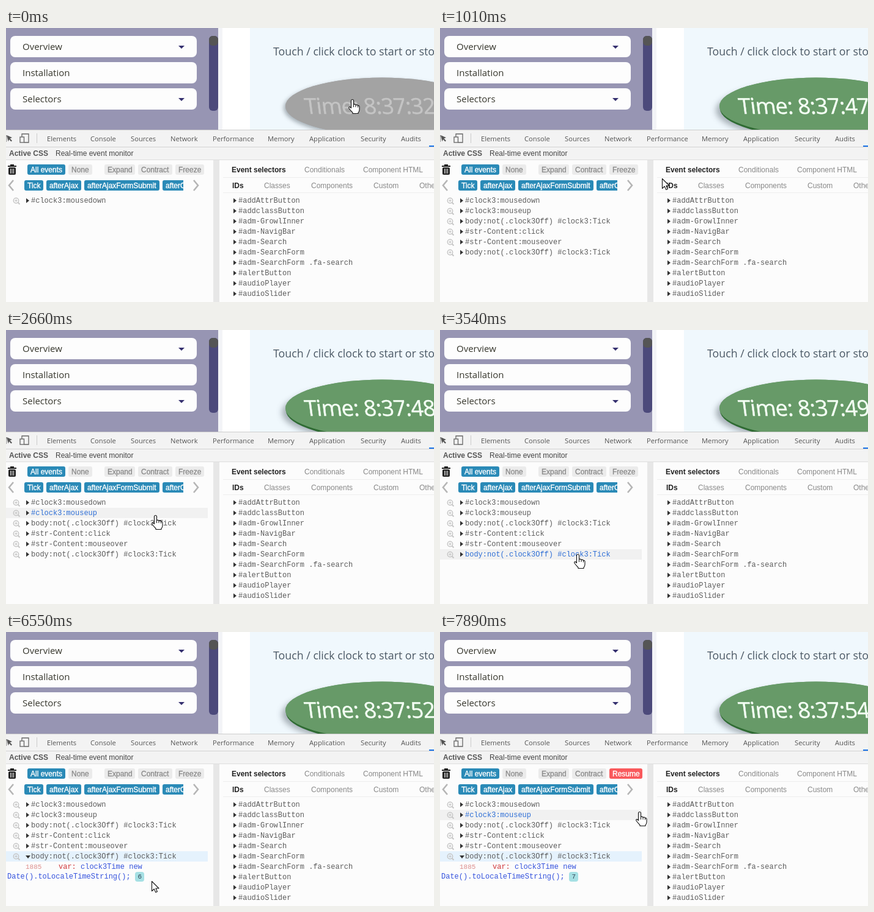
An HTML page with a canvas that plays this animation: 700x450 px, repeating every 8 s.

```html
<!DOCTYPE html>
<html lang="en">
<head>
<meta charset="utf-8">
<title>Real-time event monitor</title>
<style>
html, body { margin: 0; width: 100%; height: 100%; overflow: hidden; background: #fff; }
canvas { display: block; width: 700px; height: 450px; }
</style>
</head>
<body>
<canvas id="stage" width="700" height="450"></canvas>
<script>
const ctx = document.getElementById('stage').getContext('2d');
const LOOP = 8000;
const UI = '"Open Sans", "Noto Sans", sans-serif';
const ARIAL = '"Liberation Sans", Arial, sans-serif';
const MONO = '"Liberation Mono", "Courier New", monospace';
const BLUE = '#2a8ab7', INK = '#5c5c5c';

const TICKS = [130, 1010, 2050, 3100, 3970, 4980, 5990, 6980, 7890];
const RELEASE = 130, LEAVE = 570, EXPAND = 3670, FREEZE = 7130;

// Pointer legs: first step, last step, number of steps, end point
const LEGS = [
  [280, 1010, 6, 363, 247],
  [1160, 1160, 1, 338, 268],
  [1320, 1770, 4, 250, 294],
  [2510, 2660, 2, 245, 305],
  [2810, 3240, 4, 226, 369],
  [3970, 4680, 6, 221, 427],
  [4830, 4980, 2, 233, 414],
  [5560, 5690, 2, 237, 411],
  [5990, 6550, 5, 238, 409],
  [6690, 6980, 3, 300, 228],
  [7440, 7890, 4, 327, 296]
];

const TICK_ROW = 'body:not(.clock3Off) #clock3:Tick';
const EVENTS = [
  ['#clock3:mousedown', 0],
  ['#clock3:mouseup', RELEASE],
  [TICK_ROW, RELEASE],
  ['#str-Content:click', RELEASE],
  ['#str-Content:mouseover', LEAVE],
  [TICK_ROW, TICKS[1]]
];
const SELECTORS = ['#addAttrButton', '#addclassButton', '#adm-GrowlInner', '#adm-NavigBar',
  '#adm-Search', '#adm-SearchForm', '#adm-SearchForm .fa-search', '#alertButton',
  '#audioPlayer', '#audioSlider'];

const HAND = new Path2D('M-2.5 1.5Q-2.5-.5-.5-.5Q1.5-.5 1.5 1.5V7.5Q4 6.5 5 8.5Q7.5 7.5 8.5 9.5' +
  'Q11 9 11 11.5V16Q11 19 9 21V22.5H0V21Q-3 18-6 14Q-7 11.5-4.5 11.5L-2.5 13.5Z');
const ARROW = new Path2D('M.5.5V16.5L4.3 13L6.8 18.6L9.4 17.5L7 12H12Z');
const INSPECT = new Path2D('M1 176L10 180L6.5 181.5L10 185L8.5 186.5L5 183L3.5 186.5Z');

function rect(x, y, w, h, color) {
  ctx.fillStyle = color;
  ctx.fillRect(x, y, w, h);
}

function round(x, y, w, h, r, color) {
  ctx.fillStyle = color;
  ctx.beginPath();
  ctx.roundRect(x, y, w, h, r);
  ctx.fill();
}

function text(str, x, y, font, color) {
  ctx.font = font;
  ctx.fillStyle = color;
  ctx.fillText(str, x, y);
}

function heavyText(str, x, y, font, color, weight) {
  text(str, x, y, font, color);
  ctx.strokeStyle = color;
  ctx.lineWidth = weight;
  ctx.strokeText(str, x, y);
}

function poly(color, ...pts) {
  ctx.fillStyle = color;
  ctx.beginPath();
  for (let i = 0; i < pts.length; i += 2) ctx.lineTo(pts[i], pts[i + 1]);
  ctx.fill();
}

function line(color, width, ...pts) {
  ctx.strokeStyle = color;
  ctx.lineWidth = width;
  ctx.beginPath();
  for (let i = 0; i < pts.length; i += 2) ctx.lineTo(pts[i], pts[i + 1]);
  ctx.stroke();
}

function button(label, x, y, w, bg, color) {
  round(x, y, w, 17, 3, bg);
  heavyText(label, x + 5, y + 13, '12px ' + ARIAL, color, 0.35);
}

function pointerAt(t) {
  let x = 567, y = 118;
  for (const [from, to, steps, ex, ey] of LEGS) {
    if (t < from) break;
    const gap = steps > 1 ? (to - from) / (steps - 1) : 1;
    const done = Math.min(steps, 1 + Math.floor((t - from + 4) / gap));
    x += (ex - x) * done / steps;
    y += (ey - y) * done / steps;
  }
  return { x, y };
}

const inClock = p => p.y < 167 && Math.hypot((p.x - 615) / 158, (p.y - 128) / 47) < 1;
const inFreeze = p => p.x > 276 && p.x < 332 && p.y > 223 && p.y < 242;

function hoveredRow(p, count) {
  const i = Math.floor((p.y - 275) / 17);
  return p.x < 330 && i >= 0 && i < count ? i : -1;
}

function drawClock(t, ticks) {
  const on = t >= RELEASE;
  const oval = (dx, dy, color) => {
    ctx.fillStyle = color;
    ctx.beginPath();
    ctx.ellipse(615 + dx, 128 + dy, 158, 47, 0, 0, 7);
    ctx.fill();
  };
  ctx.save();
  ctx.beginPath();
  ctx.rect(399, 0, 301, 167);
  ctx.clip();
  ctx.save();
  ctx.shadowColor = 'rgba(70,80,90,.42)';
  ctx.shadowBlur = on ? 10 : 6;
  ctx.shadowOffsetX = on ? -6 : -3;
  ctx.shadowOffsetY = on ? 7 : 3;
  oval(0, 0.5, on ? '#679a68' : '#a3a3a3');
  ctx.restore();
  if (on) oval(1, 4, '#2f6b33');
  oval(0, 0.5, on ? '#679a68' : '#a3a3a3');
  ctx.letterSpacing = '-0.8px';
  const sec = on ? 45 + ticks : 32;
  ctx.translate(490, 141);
  ctx.transform(1, 0, 0.13, 1, 0, 0);
  heavyText('Time: 8:37:' + sec, 0, 0, '36px ' + UI, on ? '#f4fff4' : '#c4c4c4', 0.5);
  ctx.restore();
}

function drawPage(t, ticks) {
  rect(0, 0, 700, 167, '#fff');
  rect(0, 0, 347, 167, '#9795b3');
  rect(347, 0, 7, 167, '#f3f4f7');
  rect(399, 0, 301, 167, '#f0f8fd');
  ['Overview', 'Installation', 'Selectors'].forEach((label, i) => {
    const y = 13 + 43 * i;
    round(7, y, 305, 35, 8, '#fdfdfd');
    text(label, 27, y + 23, '15px ' + UI, '#36362c');
    if (i !== 1) poly('#35306f', 282, y + 16, 292, y + 16, 287, y + 21);
  });
  round(332, 13, 15, 123, 6, '#4c4a7b');
  round(332, 13, 15, 16, 6, '#555');
  text('Touch / click clock to start or stop', 437, 45, '17.8px ' + UI, '#4b5864');
  drawClock(t, ticks);
}

function drawTabs() {
  rect(0, 167, 700, 50, '#f3f3f3');
  rect(0, 167, 700, 1, '#cdcdcd');
  rect(0, 195, 700, 1, '#d2d2d2');
  rect(0, 216, 700, 1, '#dedede');
  rect(692, 193, 8, 2, '#1a73e8');
  ctx.fillStyle = '#555';
  ctx.fill(INSPECT);
  line('#666', 1.3, 0, 176, 0, 187);
  line('#666', 1.3, 26, 179, 26, 174, 37, 174, 37, 188, 30, 188);
  ctx.strokeRect(23, 179, 6.5, 9);
  rect(50, 173, 1, 16, '#ccc');
  const tabs = { Elements: 67, Console: 138, Sources: 204, Network: 269, Performance: 338,
    Memory: 428, Application: 496, Security: 580, Audits: 646 };
  for (const name in tabs) text(name, tabs[name], 186, '11.2px ' + UI, '#555');
  text('Active CSS', 5, 210, 'bold 12px ' + ARIAL, '#555');
  text('Real-time event monitor', 81, 210, '12px ' + ARIAL, '#444');
}

function drawToolbar(t) {
  rect(3, 226, 14, 2, '#222');
  rect(7, 224, 6, 2, '#222');
  round(4, 229, 12, 12, 2, '#222');
  for (const x of [7, 9.5, 12]) rect(x, 231, 1, 8, '#eee');

  button('All events', 35, 224, 62, BLUE, '#fff');
  button('None', 102, 224, 39, '#ebebeb', '#8c8c8c');
  button('Expand', 161, 224, 50, '#ebebeb', '#8c8c8c');
  button('Contract', 216, 224, 56, '#ebebeb', '#8c8c8c');
  if (t >= FREEZE) button('Resume', 277, 224, 54, '#f9595c', '#fff');
  else button('Freeze', 277, 224, 47, '#ebebeb', '#8c8c8c');

  line('#b5b5b5', 2.6, 12, 250, 5, 258.5, 12, 267);
  line('#b5b5b5', 2.6, 307, 250, 314, 258.5, 307, 267);
  ctx.save();
  ctx.beginPath();
  ctx.rect(30, 245, 260, 28);
  ctx.clip();
  button('Tick', 30, 250, 31, BLUE, '#fff');
  button('afterAjax', 66, 250, 57, BLUE, '#fff');
  button('afterAjaxFormSubmit', 128, 250, 123, BLUE, '#fff');
  button('afterClick', 256, 250, 66, BLUE, '#fff');
  ctx.restore();
}

function magnifier(x, y) {
  ctx.strokeStyle = '#c6c6c6';
  ctx.lineWidth = 1.5;
  ctx.beginPath();
  ctx.arc(x, y, 4.2, 0, 7);
  ctx.stroke();
  line('#c6c6c6', 2, x + 3, y + 3, x + 6, y + 6);
  line('#c6c6c6', 1.2, x - 2.2, y, x + 2.2, y);
  line('#c6c6c6', 1.2, x, y - 2.2, x, y + 2.2);
}

function drawEvents(t, ticks, count, hover) {
  const open = t >= EXPAND;
  for (let i = 0; i < count; i++) {
    const y = 284 + 17 * i;
    const expanded = open && i === 5;
    if (expanded) rect(0, y - 9, 330, 17, '#e5f2fd');
    else if (i === hover) rect(0, y - 9, 330, 17, '#f1f1f1');
    magnifier(16.5, y - 0.5);
    if (expanded) poly('#333', 32, y - 2, 40, y - 2, 36, y + 3);
    else poly('#333', 33, y - 4.5, 38, y - 0.5, 33, y + 3.5);
    text(EVENTS[i][0], 41, y + 3, '12px ' + MONO, i === hover ? '#2f6fd6' : INK);
  }
  if (!open) return;
  const mono = '12px ' + MONO;
  text('1885', 32, 389, '11px ' + MONO, '#dc8d8b');
  text('var:', 86, 389, mono, '#d0393c');
  text('clock3Time new', 122, 389, mono, '#3553dd');
  text('Date().toLocaleTimeString();', 2, 405, mono, '#3553dd');
  round(211, 394, 15, 16, 4, '#a6e0e4');
  text(Math.min(ticks - 1, 7), 215.5, 405, '11px ' + MONO, '#345');
}

function drawSelectors() {
  rect(339, 217, 10, 233, '#e7e7e7');
  rect(355, 245, 345, 1, '#eee');
  rect(355, 270, 345, 1, '#eee');
  const font = '12px ' + ARIAL;
  text('Event selectors', 369, 237, 'bold ' + font, '#222');
  text('IDs', 370, 263, 'bold ' + font, '#222');
  const tab = (label, x, y) => text(label, x, y, font, '#888');
  tab('Conditionals', 488, 237);
  tab('Component HTML', 584, 237);
  tab('Classes', 422, 263);
  tab('Components', 499, 263);
  tab('Custom', 601, 263);
  tab('Other', 676, 263);
  SELECTORS.forEach((label, i) => {
    const y = 284 + 17 * i;
    poly('#333', 372, y - 4.5, 377, y - 0.5, 372, y + 3.5);
    text(label, 380, y + 3, '12px ' + MONO, INK);
  });
}

function drawPointer(p, hand) {
  ctx.save();
  ctx.translate(p.x, p.y);
  const shape = hand ? HAND : ARROW;
  ctx.fillStyle = '#fff';
  ctx.fill(shape);
  ctx.strokeStyle = '#111';
  ctx.lineWidth = 1.1;
  ctx.lineJoin = 'round';
  ctx.stroke(shape);
  if (hand) {
    line('#111', 1, 1.5, 7.5, 1.5, 12);
    line('#111', 1, 5, 8.5, 5, 12);
    line('#111', 1, 8.5, 9.5, 8.5, 12.5);
  }
  ctx.restore();
}

function draw(t) {
  const ticks = TICKS.filter(at => t >= at).length;
  const count = EVENTS.filter(e => t >= e[1]).length;
  const p = pointerAt(t);
  const hover = hoveredRow(p, count);
  rect(0, 0, 700, 450, '#fcfcfc');
  drawPage(t, ticks);
  drawTabs();
  drawToolbar(t);
  drawEvents(t, ticks, count, hover);
  drawSelectors();
  drawPointer(p, hover >= 0 || inClock(p) || inFreeze(p));
}

const start = performance.now();
function loop() {
  draw((performance.now() - start) % LOOP);
  requestAnimationFrame(loop);
}
loop();
</script>
</body>
</html>
```
